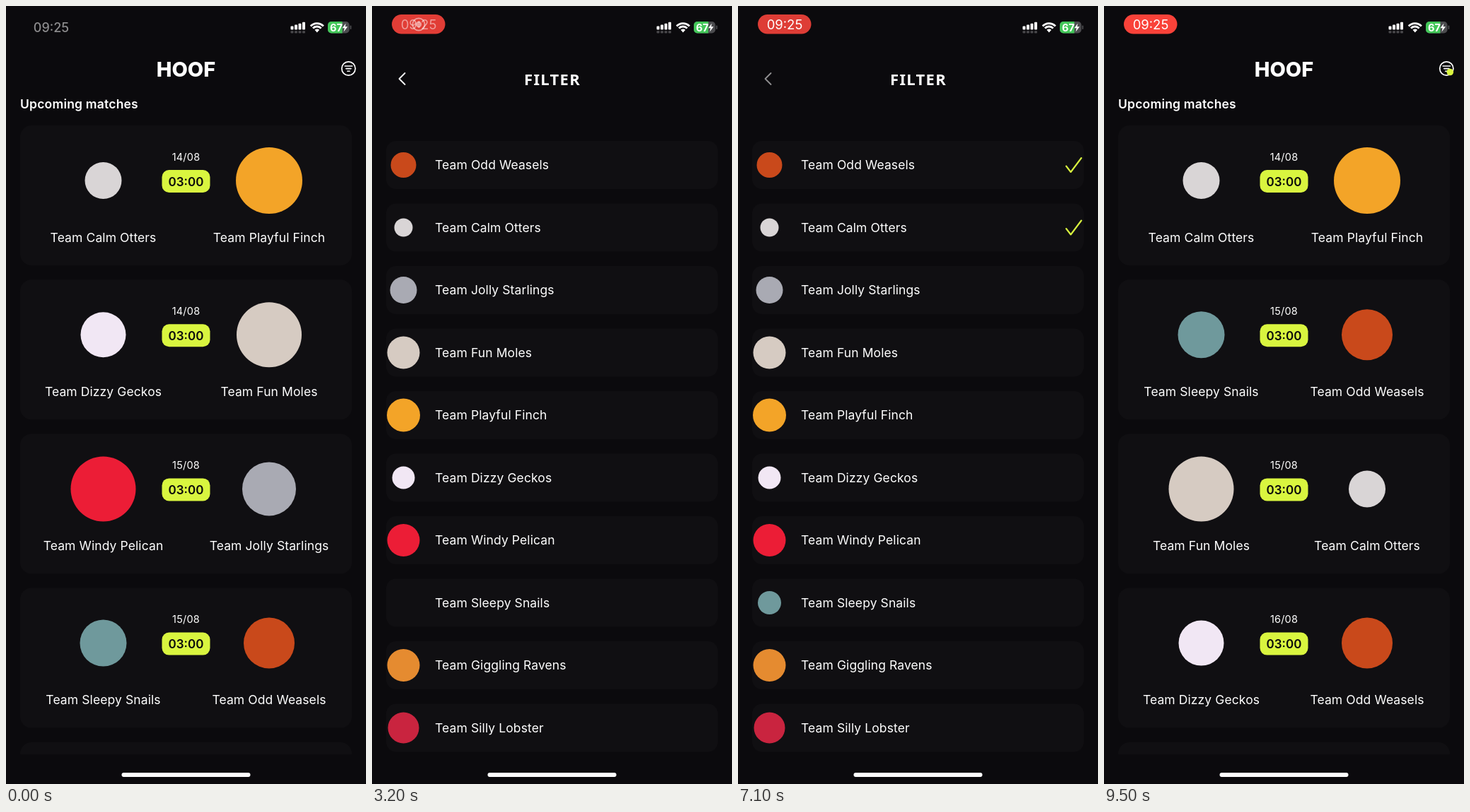
Write an HTML page with a canvas that moves like this. It is 509x1101 px and loops after 9600 ms.

```html
<!DOCTYPE html>
<html lang="en">
<head>
<meta charset="utf-8">
<title>Match filter</title>
<style>
  html, body { margin: 0; width: 100%; height: 100%; overflow: hidden; background: #0b0a0d; }
  canvas { display: block; width: 509px; height: 1101px; }
</style>
</head>
<body>
<canvas id="stage" width="509" height="1101"></canvas>
<script>
const W = 509, H = 1101, LOOP = 9600, STEP = 100;
const BG = '#0b0a0d', CARD = '#100f12', LIME = '#d9f53f', WHITE = '#fff';
const ctx = document.getElementById('stage').getContext('2d');

// name, badge colour, badge diameter on a match card
const team = (name, color, size) => ({ name: 'Team ' + name, color, size });
const weasels = team('Odd Weasels', '#c9491b', 72);
const otters = team('Calm Otters', '#d9d5d6', 52);
const starlings = team('Jolly Starlings', '#a9aab3', 76);
const moles = team('Fun Moles', '#d6cbc2', 92);
const finch = team('Playful Finch', '#f3a428', 94);
const geckos = team('Dizzy Geckos', '#f1e7f4', 64);
const pelican = team('Windy Pelican', '#ec1d36', 92);
const snails = team('Sleepy Snails', '#6f999c', 66);
const ravens = team('Giggling Ravens', '#e58b30', 92);
const lobster = team('Silly Lobster', '#c9243f', 88);

const teams = [weasels, otters, starlings, moles, finch, geckos, pelican, snails, ravens, lobster];
const allMatches = [
  ['14/08', otters, finch], ['14/08', geckos, moles],
  ['15/08', pelican, starlings], ['15/08', snails, weasels]
];
const filteredMatches = [
  ['14/08', otters, finch], ['15/08', snails, weasels],
  ['15/08', moles, otters], ['16/08', geckos, weasels]
];

const ramp = (t, start, length) => Math.min(1, Math.max(0, (t - start) / length));

// critically damped approach from 0 to 1
function spring(t, start) {
  const x = Math.max(0, t - start) * 0.02;
  return 1 - (1 + x) * Math.exp(-x);
}

function withAlpha(alpha, draw) {
  if (alpha <= 0) return;
  ctx.save();
  ctx.globalAlpha *= alpha;
  draw();
  ctx.restore();
}

function crossfade(amount, before, after) {
  withAlpha(1 - amount, before);
  withAlpha(amount, after);
}

function box(x, y, w, h, r, color) {
  ctx.fillStyle = color;
  ctx.beginPath();
  ctx.roundRect(x, y, w, h, r);
  ctx.fill();
}

function disc(x, y, r, color) {
  ctx.fillStyle = color;
  ctx.beginPath();
  ctx.arc(x, y, r, 0, Math.PI * 2);
  ctx.fill();
}

function ring(x, y, r, width, color) {
  ctx.strokeStyle = color;
  ctx.lineWidth = width;
  ctx.beginPath();
  ctx.arc(x, y, r, 0, Math.PI * 2);
  ctx.stroke();
}

function line(points, width, color) {
  ctx.strokeStyle = color;
  ctx.lineWidth = width;
  ctx.lineCap = ctx.lineJoin = 'round';
  ctx.beginPath();
  points.forEach(([x, y]) => ctx.lineTo(x, y));
  ctx.stroke();
}

// y is the middle of the capitals
function text(str, x, y, size, { weight = 400, color = WHITE, align = 'center', family = 'Inter', spacing = 0 } = {}) {
  ctx.font = `${weight} ${size}px ${family}, sans-serif`;
  ctx.letterSpacing = spacing + 'px';
  ctx.textAlign = align;
  ctx.fillStyle = color;
  ctx.fillText(str, x, y + size * 0.363);
}

function drawMatch([date, home, away], y) {
  box(20, y, 469, 198, 16, CARD);
  [[home, 137.5], [away, 372]].forEach(([side, x]) => {
    disc(x, y + 78, side.size / 2, side.color);
    text(side.name, x, y + 158.5, 17.5, { spacing: 0.1 });
  });
  text(date, 254.5, y + 44.5, 14.5, { spacing: 0.2 });
  box(220.5, y + 63, 68, 32, 10, LIME);
  text('03:00', 254.5, y + 79.5, 17, { weight: 600, color: '#0b0b0b' });
}

function drawMatches(matches) {
  ctx.save();
  ctx.beginPath();
  ctx.rect(0, 160, W, 899);
  ctx.clip();
  matches.forEach((match, i) => drawMatch(match, 169 + i * 218.2));
  box(20, 1042, 469, 198, 16, CARD);
  ctx.restore();
}

function drawHome(t) {
  ctx.fillStyle = BG;
  ctx.fillRect(0, 0, W, H);
  text('HOOF', 254.5, 89.5, 29, { weight: 800 });
  text('Upcoming matches', 20, 139, 17.5, { weight: 600, align: 'left', spacing: 0.2 });
  withAlpha(t >= 1000 && t < 1200 ? 0.5 : 1, () => {
    ring(484.3, 88.5, 9.6, 1.7, WHITE);
    [5.2, 3.6, 1.6].forEach((half, i) => {
      const y = 85 + i * 3.6;
      line([[484.3 - half, y], [484.3 + half, y]], 1.6, WHITE);
    });
    if (t > 4300) disc(489.3, 93.5, 4.8, LIME);
  });
  crossfade(ramp(t, 8200, 400), () => drawMatches(allMatches), () => drawMatches(filteredMatches));
}

function drawTeams(checked, allLoaded) {
  teams.forEach((entry, i) => {
    const y = 225 + i * 88.5;
    box(20, y - 34, 469, 68, 14, CARD);
    if (entry !== snails || allLoaded) disc(44.5, y, entry.size / 4, entry.color);
    text(entry.name, 89, y, 17.5, { align: 'left', spacing: 0.1 });
    if (i < checked) line([[464, y + 1.5], [470.5, y + 10], [485.5, y - 10]], 2.1, LIME);
  });
}

function drawFilter(t) {
  ctx.fillStyle = BG;
  ctx.fillRect(0, 0, W, H);
  withAlpha(t >= 7100 ? 0.55 : 1, () => line([[46.5, 95], [38.5, 103], [46.5, 111]], 1.8, WHITE));
  text('FILTER', 255, 104, 22, { weight: 700, family: '"Noto Sans"', spacing: 1.3 });
  const first = ramp(t, 4300, 400), second = ramp(t, 6200, 400);
  withAlpha(ramp(t, 2000, 400), () => {
    if (second > 0) crossfade(second, () => drawTeams(1, false), () => drawTeams(2, true));
    else crossfade(first, () => drawTeams(0, false), () => drawTeams(1, false));
  });
}

function drawScreens(t) {
  const open = t < 7000 ? spring(t, 1050) : 1 - spring(t, 7220);
  const place = (x, draw) => {
    ctx.save();
    ctx.translate(x, 0);
    draw(t);
    ctx.restore();
  };
  if (open < 0.9999) place(-152.7 * open, drawHome);
  if (open > 0.002) place(W * (1 - open), drawFilter);
}

function drawRecording(t) {
  const shown = ramp(t, 0, 400), swap = ramp(t, 3050, 300);
  const glow = 0.5 - 0.5 * Math.cos((t - 7100) / 1000 * Math.PI * 2);
  withAlpha(0.53 * (1 - ramp(t, 0, 200)), () => text('09:25', 64, 30.5, 18, { weight: 500 }));
  withAlpha(shown, () => {
    box(28, 12, 75.5, 27.5, 13.75, `rgb(${222 + 30 * glow}, ${61 + 5 * glow}, ${54 + 3 * glow})`);
    withAlpha(1 - swap, () => {
      ring(66, 26, 8.6, 1.8, WHITE);
      disc(66, 26, 4.2, WHITE);
    });
    withAlpha(swap, () => text('09:25', 66, 26, 18.5));
  });
}

function drawStatus() {
  for (let i = 0; i < 4; i++) {
    const x = 402.5 + i * 5.5, top = 28.5 - i * 1.9;
    box(x, top, 4, 33.5 - top, 1, WHITE);
    box(x, 35.3, 4, 3.3, 1, '#4a494c');
  }
  // wifi: two arcs over a small wedge
  ctx.strokeStyle = WHITE;
  ctx.lineCap = 'butt';
  ctx.lineWidth = 2.8;
  [12.4, 8].forEach(r => {
    ctx.beginPath();
    ctx.arc(439.8, 37, r, -Math.PI * 0.76, -Math.PI * 0.24);
    ctx.stroke();
  });
  ctx.fillStyle = WHITE;
  ctx.beginPath();
  ctx.moveTo(439.8, 37.4);
  ctx.arc(439.8, 37, 4.6, -Math.PI * 0.76, -Math.PI * 0.24);
  ctx.fill();

  ctx.save();
  ctx.beginPath();
  ctx.roundRect(455, 22, 30.5, 16.5, 5);
  ctx.clip();
  box(455, 22, 31, 17, 0, '#4b4b4e');
  box(455, 22, 20.5, 17, 0, '#43c759');
  ctx.restore();
  box(486.5, 27.5, 1.8, 5.5, 1, '#4b4b4e');
  text('67', 467, 30.5, 14.5, { weight: 700 });
  ctx.beginPath();
  [[480.5, 24.5], [475.5, 31.3], [478.7, 31.3], [477.5, 36.5], [483, 29.3], [479.5, 29.3]]
    .forEach(([x, y]) => ctx.lineTo(x, y));
  ctx.fill();
}

function draw(t) {
  ctx.fillStyle = BG;
  ctx.fillRect(0, 0, W, H);
  drawScreens(t);
  drawRecording(t);
  drawStatus();
  box(163.5, 1085, 182, 6, 3, WHITE);
}

const startTime = performance.now();
function tick() {
  const elapsed = (performance.now() - startTime) % LOOP;
  draw(Math.floor(elapsed / STEP) * STEP);
  requestAnimationFrame(tick);
}
tick();
</script>
</body>
</html>
```
